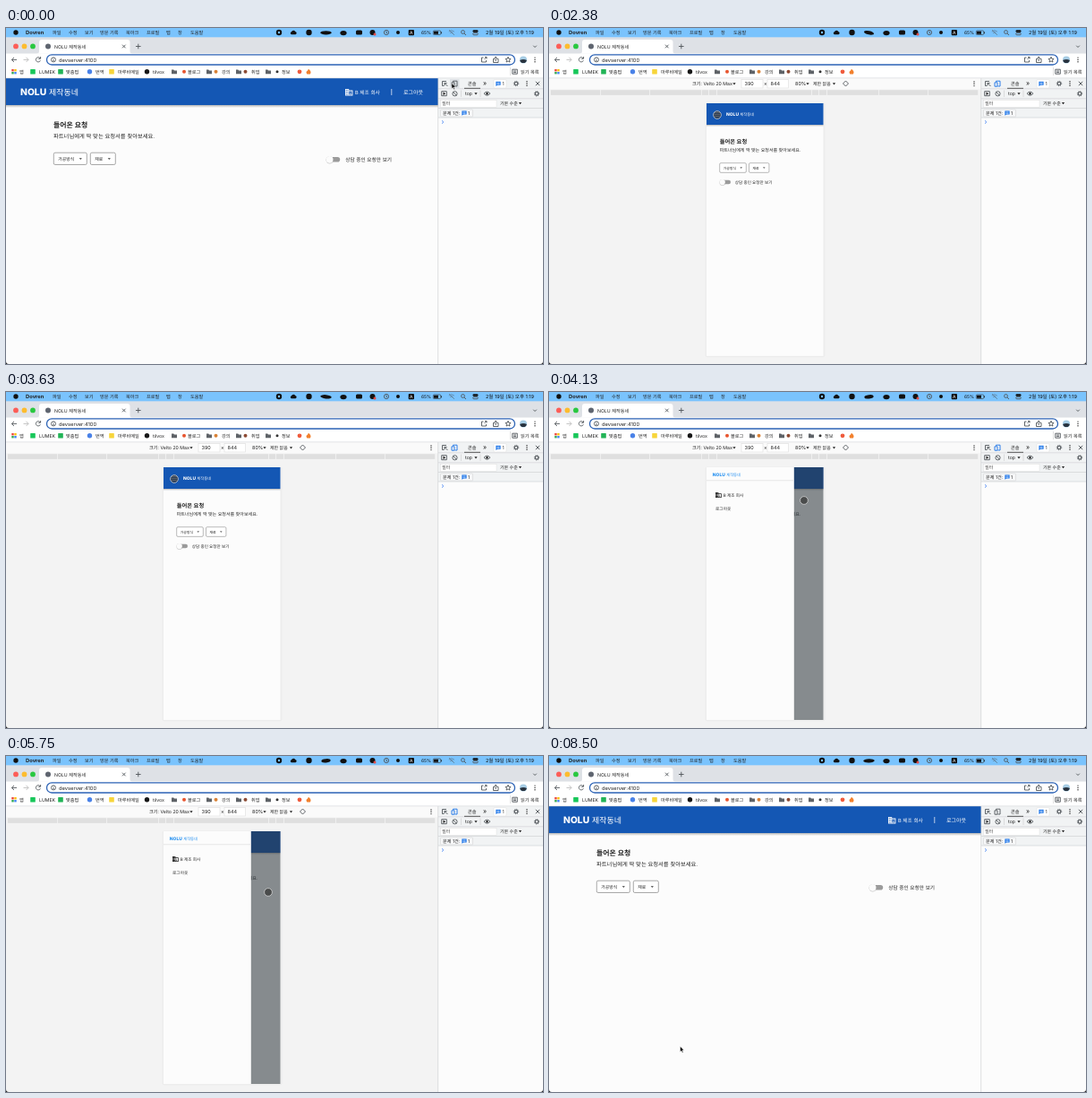
Animation of 600 by 375 pixels, one loop 8.62 s. Source, as an HTML page:

```html
<!DOCTYPE html>
<html lang="ko">
<head>
<meta charset="utf-8">
<title>Responsive menu</title>
<style>
  html, body { margin: 0; width: 100%; height: 100%; overflow: hidden; background: #fcfcfc; }
  svg { display: block; width: 100vw; height: 100vh; }
  text { font-family: Inter, "Noto Sans CJK KR", "Noto Sans CJK", sans-serif; white-space: pre; text-rendering: geometricPrecision; }
  .page text { font-family: "Noto Sans CJK KR", "Noto Sans CJK", sans-serif; }
  .line { fill: none; stroke: #50555a; stroke-width: .9; }
  text.bold { font-weight: 700; }
</style>
</head>
<body>
<svg viewBox="0 0 600 375" fill="#222">
  <defs>
    <path id="folder" d="M-3-2.2h2.3l.8.8H3v3.8h-6z" fill="#5f6368"/>
    <path id="down" d="M-1.6-1h3.2L0 1.2z"/>
    <g id="dots"><circle cy="-2.3" r=".7"/><circle r=".7"/><circle cy="2.3" r=".7"/></g>
    <g id="gear"><circle r="1.8" fill="none" stroke="#50555a" stroke-width="1.1"/><circle r="2.7" fill="none" stroke="#50555a" stroke-width=".9" stroke-dasharray="1.06 1.06"/></g>
    <g id="bubble"><path d="M-2.6-2.4h5.2v4H-.8l-1.8 1.2z" fill="#1a73e8"/><path d="M-1.5-1.1h3M-1.5.3h3" stroke="#fff" stroke-width=".6"/></g>
    <g id="logo"><text class="bold" font-size="10.3" style="font-weight:800">NOLU</text><text x="32" font-size="9">제작동네</text></g>
    <g id="member">
      <path fill-rule="evenodd" d="M0 .4h4.2v1.7h4.2V8H0zM.8 1.3h.9v.9H.8zM2.5 1.3h.9v.9h-.9zM.8 3h.9v.9H.8zM2.5 3h.9v.9h-.9zM.8 4.7h.9v.9H.8zM2.5 4.7h.9v.9h-.9zM.8 6.3h.9v.9H.8zM2.5 6.3h.9v.9h-.9zM4.3 3h3.2v4.1H4.3z"/>
      <path d="M5.3 3.9h1.1v.9H5.3zM5.3 5.5h1.1v.9H5.3z"/>
      <text x="11" y="6.2" font-size="5.7">B 제조 회사</text>
    </g>
    <g id="intro">
      <text class="bold" font-size="7.9">들어온 요청</text>
      <text y="11.5" font-size="6.3">파트너님에게 딱 맞는 요청서를 찾아보세요.</text>
    </g>
    <g id="filters">
      <g fill="#fff" stroke="#858585" stroke-width=".7"><rect width="37" height="13.3" rx="1.6"/><rect x="41" width="28" height="13.3" rx="1.6"/></g>
      <g font-size="4.9"><text x="5" y="8.5">가공방식</text><text x="46" y="8.5">재료</text></g>
      <use href="#down" x="30" y="6.8" fill="#666"/><use href="#down" x="62" y="6.8" fill="#666"/>
    </g>
    <g id="toggle">
      <rect y="-2.8" width="11.5" height="5.6" rx="2.8" fill="#9b9b9b"/>
      <circle cy=".5" r="4.2" fill="#000" opacity=".2"/><circle r="3.9" fill="#fcfcfc"/>
      <text x="17.5" y="2" font-size="5.7">상담 중인 요청만 보기</text>
    </g>
    <linearGradient id="shade" x2="0" y2="1"><stop stop-color="#000" stop-opacity=".28"/><stop offset="1" stop-color="#000" stop-opacity="0"/></linearGradient>
    <clipPath id="screen"><rect x="176" y="84" width="130.5" height="282"/></clipPath>
  </defs>

  <rect width="600" height="375" fill="#fcfcfc"/>

  <!-- desktop page -->
  <g class="page">
    <rect y="86" width="483" height="3" fill="url(#shade)"/>
    <rect y="56" width="483" height="30" fill="#1457b4"/>
    <g fill="#fff">
      <use href="#logo" x="16" y="75"/>
      <use href="#member" x="379" y="67.5"/>
      <rect x="430.5" y="68" width=".7" height="7"/>
      <text x="444" y="73.6" font-size="6">로그아웃</text>
    </g>
    <use href="#intro" x="53" y="111"/>
    <use href="#filters" x="53.3" y="139.2"/>
    <use href="#toggle" x="361.7" y="146.8"/>
  </g>
  <g id="wideTip">
    <rect x="435" y="57" width="48" height="10.5" fill="#d0d3d7"/>
    <text x="437.5" y="64.4" font-size="5.8">1158px × 764px</text>
  </g>

  <!-- device preview -->
  <g id="mobile">
    <rect y="56" width="483" height="319" fill="#f3f3f3"/>
    <rect y="56" width="483" height="12.5" fill="#fafafa"/>
    <g id="mediaBar" fill="#dfdfdf"></g>
    <g font-size="5.5">
      <text x="160" y="64.2" font-size="5.2">크기: Velto 20 Max</text><use href="#down" x="207" y="62.2"/>
      <g fill="#fff" stroke="#ddd" stroke-width=".6"><rect x="215" y="57.5" width="24" height="9.5"/><rect x="244" y="57.5" width="23.5" height="9.5"/></g>
      <text x="218.5" y="64.2">390</text><text x="240" y="64.2">×</text><text x="247.5" y="64.2">844</text>
      <text x="275" y="64.2">80%</text><use href="#down" x="289" y="62.2"/>
      <text x="295" y="64.2" font-size="5">제한 없음</text><use href="#down" x="318.5" y="62.2"/>
    </g>
    <path class="line" d="M328.5 62l3-3 3 3-3 3z"/>
    <use href="#dots" x="475" y="62.3"/>
    <rect x="174.5" y="83.5" width="134" height="284" rx="2" opacity=".025"/>
    <g class="page" clip-path="url(#screen)">
      <rect x="176" y="84" width="131" height="282" fill="#fcfcfc"/>
      <rect x="176" y="108" width="131" height="2" fill="url(#shade)"/>
      <rect x="176" y="84" width="131" height="24" fill="#1457b4"/>
      <path d="M184.7 94.3h6.3M184.7 96.4h6.3M184.7 98.5h6.3" stroke="#fff" stroke-width=".8"/>
      <use href="#logo" transform="translate(198 98.2) scale(.48)" fill="#fff"/>
      <use href="#intro" transform="translate(190.7 128.5) scale(.8)"/>
      <use href="#filters" transform="translate(190.7 150.7) scale(.8)"/>
      <use href="#toggle" transform="translate(193.8 172) scale(.8)"/>
      <rect id="backdrop" x="176" y="84" width="131" height="282" fill="#2b3439" fill-opacity=".56"/>
      <g id="drawer">
        <rect x="174" y="82" width="99.8" height="286" fill="#fcfcfc"/>
        <use href="#logo" transform="translate(182.8 94.2) scale(.48)" fill="#1e8df0"/>
        <rect x="176" y="98.5" width="97.8" height=".7" fill="#ddd"/>
        <use href="#member" transform="translate(186 111.6) scale(.8)"/>
        <text x="186" y="131.5" font-size="4.7">로그아웃</text>
      </g>
      <g id="narrowTip">
        <rect x="294.5" y="84" width="13" height="12" fill="#c9cdd2"/>
        <text x="297" y="92.4" font-size="5.8">390px × 844px</text>
      </g>
    </g>
  </g>

  <!-- developer panel -->
  <rect x="483" y="56" width="117" height="319" fill="#fcfcfc"/>
  <rect x="483" y="56" width="117" height="44" fill="#f1f3f4"/>
  <path d="M482.7 56v319M483 67.8h117M483 78.8h117M483 89.5h117M483 100h117" stroke="#cbcdd1" stroke-width=".6"/>
  <rect id="hover" x="496" y="57.2" width="10.5" height="10" fill="#dce0e4"/>
  <path class="line" d="M492 59.5h-4.5v5h2M490 61.5l3.5 3.5M490 64v-2.5h2.6"/>
  <path id="deviceButton" class="line" d="M499.5 60v-.8h4.5v5.8h-2.5M498 60.8h3v4.4h-3z"/>
  <g font-size="5.2">
    <text x="516" y="64.3">콘솔</text><text x="533" y="64.4" font-size="7">»</text>
    <rect x="545" y="57.5" width="14" height="9.5" rx="1" fill="#fff" stroke="#ddd" stroke-width=".5"/>
    <use href="#bubble" x="550" y="62.2"/><text x="554.5" y="64.2">1</text>
    <use href="#gear" x="570" y="62"/><use href="#dots" x="582" y="62"/>
    <path class="line" d="M591.8 59.8l4.4 4.4m0-4.4l-4.4 4.4"/>
    <rect x="512" y="66.8" width="18" height="1" fill="#555"/>
    <path class="line" d="M486.7 70.7h5.6v5h-5.6z"/><path d="M488.5 71.5v3.4l2.7-1.7z"/>
    <circle class="line" cx="501.5" cy="73.3" r="2.6"/><path class="line" d="M499.7 71.5l3.6 3.6"/>
    <path d="M508.5 69.5v7.5M530 69.5v7.5" stroke="#ccc" stroke-width=".6"/>
    <text x="513" y="75">top</text><use href="#down" x="525" y="73.2"/>
    <path class="line" d="M534 73.2q3.5-4 7 0q-3.5 4-7 0z"/><circle cx="537.5" cy="73.2" r="1.2"/>
    <use href="#gear" x="593" y="73.3"/>
    <rect x="485.5" y="80.3" width="62.5" height="8" fill="#fff" stroke="#ddd" stroke-width=".5"/>
    <text x="487" y="86" fill="#555">필터</text><text x="552" y="86" font-size="5">기본 수준</text><use href="#down" x="574.5" y="84.1"/>
    <rect x="485.5" y="91" width="36" height="8" rx="1" fill="#f7f8f9" stroke="#ccc" stroke-width=".5"/>
    <text x="488" y="96.9">문제 1건:</text><use href="#bubble" x="512" y="95"/><text x="516" y="96.9">1</text>
  </g>
  <path d="M487 103.3l1.8 1.7-1.8 1.7" fill="none" stroke="#367cf1" stroke-width=".8"/>

  <!-- browser frame -->
  <rect y="10" width="600" height="19" fill="#dee1e6"/>
  <rect y="28.5" width="600" height="27.5" fill="#fff"/>
  <path d="M34 28.8q3 0 3-3V16q0-3 3-3h95.5q3 0 3 3v9.8q0 3 3 3z" fill="#fff"/>
  <circle cx="11" cy="20.4" r="2.9" fill="#fc5d57"/><circle cx="20.5" cy="20.4" r="2.9" fill="#fdbc2e"/><circle cx="30" cy="20.4" r="2.9" fill="#29c840"/>
  <circle cx="47" cy="20.5" r="3" fill="#5f6570"/>
  <text x="54" y="22.6" font-size="5.2">NOLU 제작동네</text>
  <path class="line" d="M130 18.7l3.6 3.6m0-3.6l-3.6 3.6M145 20.5h5.6M147.8 17.7v5.6M589.2 19.7l1.8 1.8 1.8-1.8"/>
  <path class="line" d="M12 35.4H6.5M9 32.8l-2.6 2.6L9 38"/>
  <path class="line" style="stroke:#bbb" d="M19.5 35.4H25M22.5 32.8l2.6 2.6-2.6 2.6"/>
  <path class="line" d="M38.3 34a2.6 2.6 0 1 0 .1 2.3M38.6 32v2.3h-2.3"/>
  <rect x="45.5" y="29.8" width="523" height="11.2" rx="5.6" fill="#fff" stroke="#2d63b5" stroke-width="1.3"/>
  <circle class="line" cx="53" cy="35.4" r="2.5"/><path class="line" d="M53 35v2M53 33.5v.6"/>
  <text x="59" y="37.5" font-size="5.75">devserver:4100</text>
  <path class="line" d="M533.5 33h-2v5h5v-2M534.5 35l2.5-2.5m-2 0h2v2M546 34.5h-1.5v4h5.5v-4h-1.5M547.2 37v-5m-1.6 1.6l1.6-1.6 1.6 1.6M561 32.3l.9 2.1 2.2.1-1.7 1.4.6 2.2-2-1.2-2 1.2.6-2.2-1.7-1.4 2.2-.1z"/>
  <circle cx="578" cy="35.4" r="4" fill="#a7cde5"/><path d="M574.1 36q4-2 7.8 0a4 4 0 0 1-7.8 0" fill="#29333f"/>
  <use href="#dots" x="591" y="35.4"/>
  <rect y="55.6" width="600" height=".6" fill="#cfd2d6"/>
  <rect x="563" y="44" width=".6" height="9" fill="#ccc"/>
  <path class="line" d="M565.8 46.2h5.5v5h-5.5zM567 48h3M567 49.6h3"/>
  <g id="bookmarks" font-size="5.2"></g>

  <!-- system bar -->
  <rect width="600" height="10.3" fill="#7ac3fd"/>
  <circle cx="11" cy="5" r="2.7" fill="#111"/>
  <text class="bold" x="22" y="7" font-size="5.8">Dovren</text>
  <g id="menus" font-size="5.2"></g>
  <g fill="#111">
    <circle cx="305" cy="5" r="3.2"/><circle cx="305" cy="5" r="1.2" fill="#7ac3fd"/>
    <path d="M319 7.3a1.6 1.6 0 0 1 0-3.1 2.3 2.3 0 0 1 4.2-.2 1.7 1.7 0 0 1 .3 3.3z"/>
    <circle cx="338.5" cy="5" r="3.2"/>
    <ellipse id="runner" rx="6" ry="2.1"/>
    <ellipse cx="377" cy="5.6" rx="3.6" ry="2.6"/>
    <rect x="391" y="2.4" width="7" height="5" rx="1.5"/>
    <circle cx="409.5" cy="5" r="3"/><circle cx="412" cy="7" r="1.5" fill="#e64b45"/>
    <circle class="line" cx="425" cy="5" r="2.6"/><path class="line" d="M425 3.5v1.7l1.2.8"/>
    <circle cx="438" cy="5" r="2"/>
    <rect x="449.7" y="2" width="6.3" height="6.2" rx="1"/><text x="450.9" y="7" font-size="5" fill="#fff">A</text>
    <text x="464" y="7" font-size="5">65%</text>
    <rect x="477.3" y="3" width="8.4" height="4.5" rx="1" fill="none" stroke="#333" stroke-width=".6"/><rect x="478" y="3.7" width="5" height="3.1"/><rect x="486.1" y="4.3" width=".7" height="2"/>
    <path class="line" d="M494.8 4q3-2.4 6 0M496.2 5.6q1.6-1.2 3.2 0M495 2l6 6" opacity=".55"/>
    <circle class="line" cx="510.5" cy="4.5" r="1.9"/><path class="line" d="M512 6l2 2"/>
    <rect x="521.5" y="2.2" width="6" height="2.5" rx="1.2"/><rect class="line" x="521.7" y="5.5" width="5.6" height="2.2" rx="1.1"/>
    <text x="536" y="7" font-size="5.5">2월 19일 (토) 오후 1:19</text>
  </g>

  <!-- rounded window corners -->
  <path d="M0 372q0 3 3 3H0zM600 372q0 3-3 3h3z" fill="#111"/>

  <g id="pointer">
    <path id="arrow" d="M0 0v6.2l1.5-1.3 1 2.3 1-.4-1-2.3h1.9z" fill="#000" stroke="#fff" stroke-width=".5"/>
    <path id="hand" d="M-.7.2q.7-.8 1.3 0v2.5l2.4.5q.8.3.6 1.2L3 7h-3.6L-2.4 4.4q.4-1 1.7 0z" fill="#fff" stroke="#111" stroke-width=".7"/>
    <circle id="touch" r="4.4" fill="#333" fill-opacity=".72" stroke="#ddd" stroke-width=".7"/>
  </g>
</svg>
<script>
const LOOP = 8620, STEP = 125;
const el = id => document.getElementById(id);
const label = (x, y, s) => `<text x="${x}" y="${y}">${s}</text>`;

el('menus').innerHTML = [[52, '파일'], [70, '수정'], [88, '보기'], [105, '방문 기록'], [134, '북마크'],
  [157, '프로필'], [179, '탭'], [192, '창'], [206, '도움말']].map(([x, s]) => label(x, 7, s)).join('');

const dot = (x, color, r = 2.7) => `<circle cx="${x}" cy="48.8" r="${r}" fill="${color}"/>`;
const tile = (x, color) => `<rect x="${x - 2.8}" y="46" width="5.6" height="5.6" rx=".6" fill="${color}"/>`;
const folder = x => `<use href="#folder" x="${x}" y="48.8"/>`;
const appColors = ['#ea4335', '#fbbc05', '#34a853', '#4285f4'];
el('bookmarks').innerHTML =
  appColors.map((c, i) => `<rect x="${6.3 + i % 2 * 3}" y="${46 + (i >> 1) * 3}" width="2.4" height="2.4" fill="${c}"/>`).join('') +
  tile(30, '#18c75a') + tile(61, '#22b457') + dot(93.5, '#4a82e8') + tile(118, '#f7d53b') + dot(157.5, '#181818') +
  [188, 227, 260, 293].map(folder).join('') +
  dot(199, '#e8552f', 2) + dot(234.5, '#d98236', 2) + dot(267.5, '#8d4b34', 2) + dot(303, '#333', 1.5) +
  dot(328, '#ef5a3c', 2.4) +
  '<path d="M338 45.8q4 3 1.8 5.6h-3.4q-2-2.4.4-3.6z" fill="#f2812e"/>' +
  [[15, '앱'], [37, 'LUMEK'], [67, '맞춤법'], [100, '번역'], [125, '마루비메일'], [164, 'tilvox'], [203, '블로그'],
    [241, '강의'], [274, '취업'], [308, '정보'], [575, '읽기 목록']].map(([x, s]) => label(x, 50.7, s)).join('');

const edges = [2, 58, 113, 171, 179, 188, 294, 302, 311, 369, 424, 480];
el('mediaBar').innerHTML = edges.slice(1).map((x, i) =>
  `<rect x="${edges[i]}" y="69.3" width="${x - edges[i] - .8}" height="5.6"/>`).join('');

// Rows: time, then values
const path = [
  [0, 498, 61.5], [880, 498, 61.5], [1250, 499, 63], [1500, 499, 63], [2130, 188, 97], [2400, 188, 97],
  [2880, 279, 123], [3130, 279, 123], [3500, 188, 97], [3750, 188, 97], [4130, 285, 121], [4500, 285, 121],
  [5000, 188, 97], [5250, 188, 97], [5750, 293, 152], [6000, 293, 152], [6500, 501, 61.5], [7130, 501, 61.5],
  [7880, 146.5, 324], [LOOP, 146.5, 324]
];
const drawer = [
  [0, 0], [2400, 0], [2625, 1], [3130, 1], [3330, 0], [3750, 0], [3975, 1], [4500, 1], [4700, 0],
  [5250, 0], [5475, 1], [6000, 1], [6200, 0], [LOOP, 0]
];

function at(track, t) {
  const i = Math.max(1, track.findIndex(row => row[0] > t));
  const [a, b] = [track[i - 1], track[i]];
  const p = (t - a[0]) / (b[0] - a[0]);
  const e = p * p * (3 - 2 * p);
  return a.slice(1).map((v, k) => v + (b[k + 1] - v) * e);
}

const show = (id, on) => el(id).style.display = on ? '' : 'none';

function draw(t) {
  const [x, y] = at(path, t);
  const [open] = at(drawer, t);
  const mobile = t >= 1125 && t < 6750;
  const touch = mobile && x > 176 && x < 306 && y > 84;
  const onButton = x > 495 && y < 68;
  const hand = onButton && t > 800;

  show('mobile', mobile);
  show('narrowTip', t < 2125);
  show('wideTip', t >= 6750 && t < 7750);
  show('hover', onButton);
  el('deviceButton').style.stroke = mobile ? '#1a73e8' : '#50555a';

  show('drawer', open > 0);
  el('drawer').setAttribute('transform', `translate(${(open - 1) * 99} 0)`);
  el('backdrop').setAttribute('opacity', open);

  el('pointer').setAttribute('transform', `translate(${x} ${y})`);
  show('touch', touch);
  show('hand', hand && !touch);
  show('arrow', !hand && !touch);

  const stride = t / STEP * 2.4;
  el('runner').setAttribute('transform', `translate(357.5 5.3) rotate(${Math.sin(stride) * 12}) scale(${.95 + .1 * Math.cos(stride)} 1)`);
}

const start = performance.now();
function tick() {
  const t = (performance.now() - start) % LOOP;
  draw(Math.floor(t / STEP) * STEP);
  requestAnimationFrame(tick);
}
tick();
</script>
</body>
</html>
```
